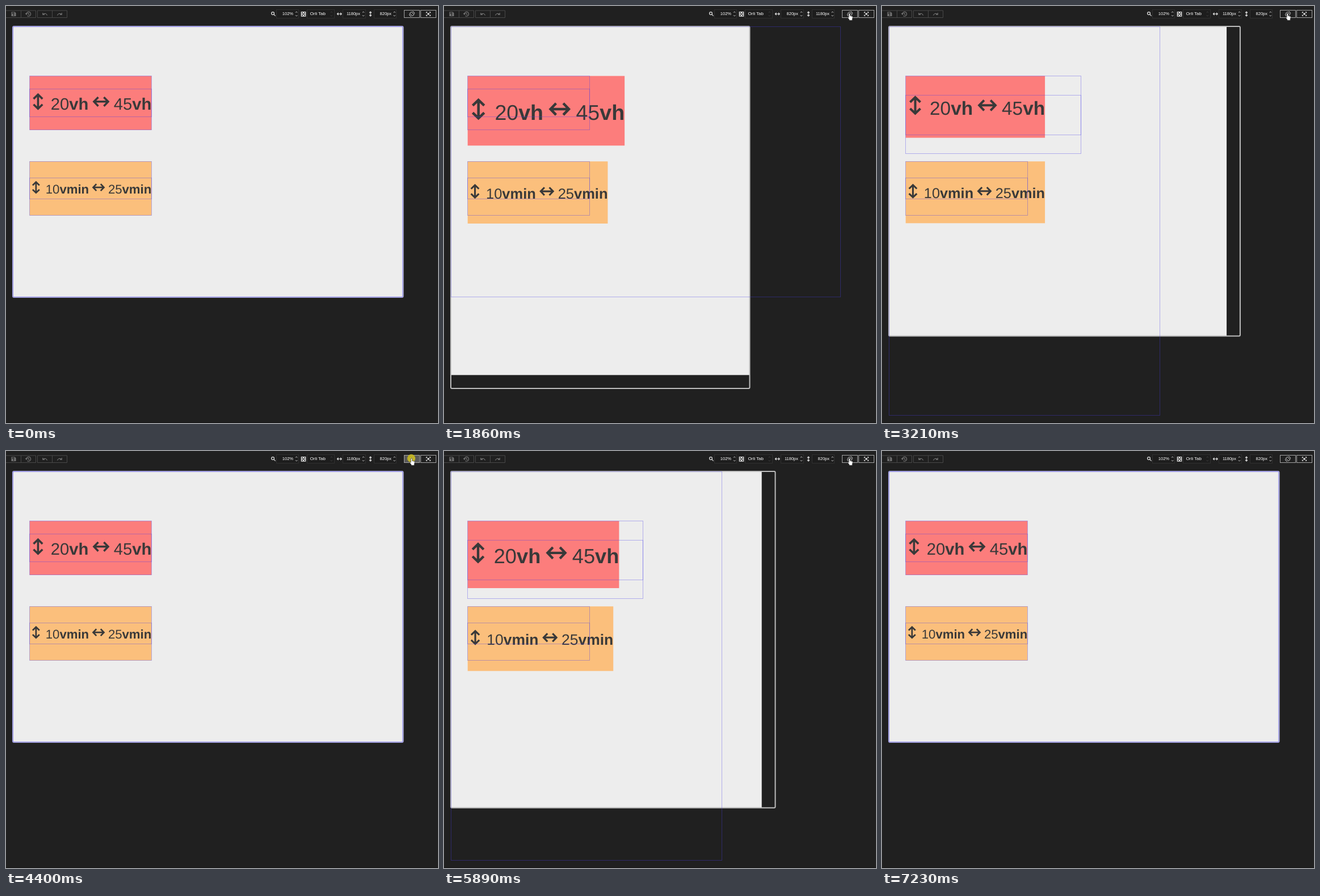
Animation of 761x736 px, one loop 7.64 s. Source, as an HTML page:

```html
<!DOCTYPE html>
<html lang="en">
<head>
<meta charset="utf-8">
<title>Viewport units</title>
<style>
  html, body { margin: 0; width: 100%; height: 100%; overflow: hidden; background: #202020; }
  svg { display: block; width: 761px; height: 736px; font-family: "Liberation Sans", Arial, sans-serif; }
  .ui { font-size: 7.5px; fill: #fff; }
  .end { text-anchor: end; }
  .label { font-size: 100px; fill: #393939; text-rendering: geometricPrecision; }
  .label use { fill: none; stroke: #393939; stroke-width: 12; }
  .bold { font-weight: bold; }
  .line { fill: none; stroke: #463ce6; stroke-opacity: .36; }
  .box { fill: #1d1d1d; stroke: #303030; }
  .dim { fill: none; stroke: #484848; }
  .dimIcon { fill: none; stroke: #747474; stroke-width: 1.2; }
  .icon { fill: none; stroke: #e4e4e4; stroke-width: 1.2; }
  .thin { stroke-width: .9; }
  .btn { fill: none; stroke: #a4a4a4; }
</style>
</head>
<body>
<svg viewBox="0 0 761 736">
  <defs>
    <path id="arrow" d="M0-42V42M-27-17L0-43L27-17M-27 17L0 43L27 17"/>
    <path id="spin" class="icon thin" d="M-1.7-2.3L0-4L1.7-2.3M-1.7 2.3L0 4L1.7 2.3"/>
    <path id="mini" class="icon" d="M0-3.5V3.5M-2-1.8L0-3.8L2-1.8M-2 1.8L0 3.8L2 1.8"/>
  </defs>
  <rect width="761" height="736" fill="#202020"/>
  <rect y="734.5" width="761" height="1.5" fill="#191919"/>

  <path class="dim" d="M-.5 8H52.5V20.5H-.5ZM26.5 8V20.5M55.5 8H107.5V20.5H55.5ZM81.5 8V20.5"/>
  <path fill="#747474" fill-rule="evenodd" d="M9.5 10.5H15.5L17.5 12.5V18H9.5ZM10.7 11.5V13.5H14.8V11.5ZM13.5 14.6A1.2 1.2 0 1 0 13.5 17A1.2 1.2 0 1 0 13.5 14.6Z"/>
  <path class="dimIcon" d="M36 14.2A3.8 3.8 0 1 1 37.5 17.2M34.2 13L36 14.8L37.8 13M39.7 12V14.5L41.4 15.5"/>
  <path class="dimIcon" d="M65.5 14.5Q70.5 11.5 72.5 16.5M64.8 12V15.2H68"/>
  <path class="dimIcon" d="M97.5 14.5Q92.5 11.5 90.5 16.5M98.2 12V15.2H95"/>

  <path class="icon" d="M472.2 15.2L474.6 17.6M472.4 13.1A2.4 2.4 0 1 1 467.6 13.1A2.4 2.4 0 1 1 472.4 13.1"/>
  <g class="box">
    <rect x="476.5" y="6.5" width="39" height="15"/>
    <rect x="530.5" y="6.5" width="48" height="15"/>
    <rect x="593.5" y="6.5" width="40" height="15"/>
    <rect x="648.5" y="6.5" width="39" height="15"/>
  </g>
  <rect x="519.7" y="10" width="8.6" height="8.6" fill="#dcdcdc"/>
  <path fill="#303030" d="M521 11.3h2v2h-2zM525 11.3h2v2h-2zM523 13.3h2v2h-2zM521 15.3h2v2h-2zM525 15.3h2v2h-2z"/>
  <use href="#spin" x="511.7" y="14"/>
  <use href="#spin" x="573.3" y="14" opacity=".2"/>
  <use href="#spin" x="629.5" y="14"/>
  <use href="#spin" x="684.3" y="14"/>
  <use href="#mini" transform="translate(587.3 14) rotate(90)"/>
  <use href="#mini" x="642" y="14"/>
  <text class="ui end" x="506" y="16.2">102%</text>
  <text class="ui" x="535.5" y="16.4" style="font-size:8px">Orli Tab</text>
  <text class="ui end" id="wide" x="624" y="16.2"></text>
  <text class="ui end" id="high" x="679" y="16.2"></text>

  <rect class="btn" id="turn" x="701.5" y="7.5" width="27" height="13"/>
  <rect class="btn" x="730.5" y="7.5" width="27" height="13"/>
  <g class="icon thin" transform="translate(715 14)">
    <rect x="-1.9" y="-3.4" width="3.8" height="6.8" transform="rotate(-45)"/>
    <path d="M.8-4.6A4.6 4.6 0 0 1 4.6-.2M-.8 4.6A4.6 4.6 0 0 1-4.6.2"/>
  </g>
  <path class="icon" d="M740.5 12.5V10.8H742.2M745.8 10.8H747.5V12.5M747.5 15.5V17.2H745.8M742.2 17.2H740.5V15.5"/>
  <rect x="742.3" y="12.5" width="3.4" height="3" fill="#e4e4e4"/>

  <rect id="page" x="13" y="37" fill="#ededed"/>
  <rect id="red" x="41.7" y="123.5" fill="#fc7d7c"/>
  <rect id="amber" x="41.7" y="274.3" fill="#fbbf7c"/>
  <g id="redText" class="label"></g>
  <g id="amberText" class="label"></g>
  <rect id="frame" x="12" y="36" rx="2" fill="none" stroke-width="2"/>
  <g class="line">
    <rect id="pageLine" x="12.5" y="36.5"/>
    <rect id="redLine"/><rect id="redInner"/>
    <rect id="amberLine"/><rect id="amberInner"/>
  </g>

  <circle id="click" cx="714" cy="13" r="7.2" fill="#c8b91e" fill-opacity=".88"/>
  <path id="hand" fill="#fff" stroke="#222" stroke-width=".6" d="M713.2 14.2Q713.2 12.7 714.4 12.7Q715.6 12.7 715.6 14.2V17.4L719.2 18.2Q720.2 18.5 720.1 20L719.2 23.3V25.3H713.8V24L711.3 20.6Q710.8 19.5 712 19.4L713.2 20.2Z"/>
  <path id="pointer" fill="#fff" stroke="#222" stroke-width=".6" d="M0 0V11.4L2.6 9L4.4 13L6.2 12.2L4.5 8.4H8Z"/>
</svg>
<script>
const LOOP = 7640, STEP = 200 / 3, TURN = 296, LAG = 33;
const LONG = 686, SHORT = 476.7;
// Moments at which the picture starts to move again
const BURSTS = [560, 1390, 2990, 4400, 5680, 6620, 6890];
// Turns of the device: begin, settled, to portrait
const TURNS = [
  [1629, 2060, true], [2991, 3390, false], [4440, 4800, true], [5748, 6090, false]
];
const $ = id => document.getElementById(id);
const clamp = v => Math.min(1, Math.max(0, v));
const mix = (a, b, k) => a + (b - a) * k;
const show = (id, on) => $(id).setAttribute('visibility', on ? 'visible' : 'hidden');

function set(id, attrs) {
  for (const key in attrs) $(id).setAttribute(key, attrs[key]);
}

// Each label is built at 100 units per em
const LEAD = 2, ICON = 97, SPACE = 27.8;
function buildLabel(id, first, second, unit, unitWidth) {
  const pair = 111.2 + unitWidth;
  const a = LEAD + ICON + SPACE, icon = a + pair + SPACE, b = icon + ICON + SPACE;
  const arrow = (x, turn) =>
    `<use href="#arrow" transform="translate(${x + ICON / 2} -50) rotate(${turn})"/>`;
  const num = (x, n) => `<text x="${x}">${n}<tspan class="bold">${unit}</tspan></text>`;
  $(id).innerHTML = arrow(LEAD, 0) + num(a, first) + arrow(icon, 90) + num(b, second);
  return (b + pair) / 100;
}
const EMS = {
  red: buildLabel('redText', 20, 45, 'vh', 116.7),
  amber: buildLabel('amberText', 10, 25, 'vmin', 233.4)
};
const TOP = { red: 123.5, amber: 274.3 };

function placeBox(name, size) {
  const width = size * .45, height = size * .2, font = width / EMS[name];
  set(name, { width, height });
  const base = TOP[name] + height / 2 + font * .42;
  set(name + 'Text', { transform: `translate(41.7 ${base}) scale(${font / 100})` });
}

function placeLines(name, size) {
  const width = Math.round(size * .45), height = Math.round(size * .2);
  const y = Math.floor(TOP[name]) + .5, inner = Math.round(width / EMS[name] * 1.67);
  set(name + 'Line', { x: 41.5, y, width, height });
  set(name + 'Inner', { x: 41.5, y: y + Math.round((height - inner) / 2), width, height: inner });
}

const view = tall => ({ w: mix(LONG, SHORT, tall), h: mix(SHORT, LONG, tall) });

function drawDevice(t, q) {
  let tall = 0, late = 0, old = 0, layout = 0, portrait = false, moving = false, pressed = false;
  for (const [begin, end, toTall] of TURNS) {
    if (t < end && q >= begin - 70 && q < begin) pressed = true;
    if (t < end && q < begin) break;
    const goal = toTall ? 1 : 0;
    portrait = toTall;
    if (t >= end) {
      tall = late = old = layout = goal;
      continue;
    }
    moving = true;
    tall = mix(old, goal, clamp((q - begin) / TURN));
    late = mix(old, goal, clamp((q - begin - LAG) / TURN));
    layout = toTall ? late : tall;
    break;
  }
  const now = view(tall), behind = view(late), inner = view(layout), before = view(old);
  set('page', { width: Math.min(now.w, behind.w), height: Math.min(now.h, behind.h) });
  set('frame', {
    width: now.w + 1.5, height: now.h + 1.2,
    stroke: moving ? '#bdbdbd' : portrait ? '#b0afc8' : '#b3b2e2'
  });
  set('pageLine', { width: Math.round(before.w), height: Math.round(before.h) });
  placeBox('red', inner.h);
  placeBox('amber', Math.min(inner.w, inner.h));
  placeLines('red', before.h);
  placeLines('amber', SHORT);
  $('wide').textContent = portrait ? '820px' : '1180px';
  $('high').textContent = portrait ? '1180px' : '820px';
  $('turn').style.fill = pressed ? '#585858' : 'none';
  show('click', pressed);
}

function drawCursor(t, q) {
  let at = null;
  if (t >= 560 && t < 1390) {
    const k = clamp((q - 560 + STEP) / 800), s = k * k * (3 - 2 * k);
    at = [mix(757, 713, s), mix(668, 17, s)];
  } else if (t >= 6620 && t < 6690) {
    at = [719, 40];
  } else if (t >= 6890 && t < 7230) {
    const k = (q - 6890) / 340;
    at = [mix(721, 760, k), mix(565, 734, k)];
  }
  show('hand', t >= 1390 && t < 6620);
  show('pointer', at);
  if (at) set('pointer', { transform: `translate(${at})` });
}

function snap(t) {
  const start = BURSTS.filter(b => b <= t).pop() || 0;
  return start + Math.floor((t - start) / STEP + .001) * STEP;
}

const origin = performance.now();
function draw() {
  const t = (performance.now() - origin) % LOOP, q = snap(t);
  drawDevice(t, q);
  drawCursor(t, q);
  requestAnimationFrame(draw);
}
draw();
</script>
</body>
</html>
```
